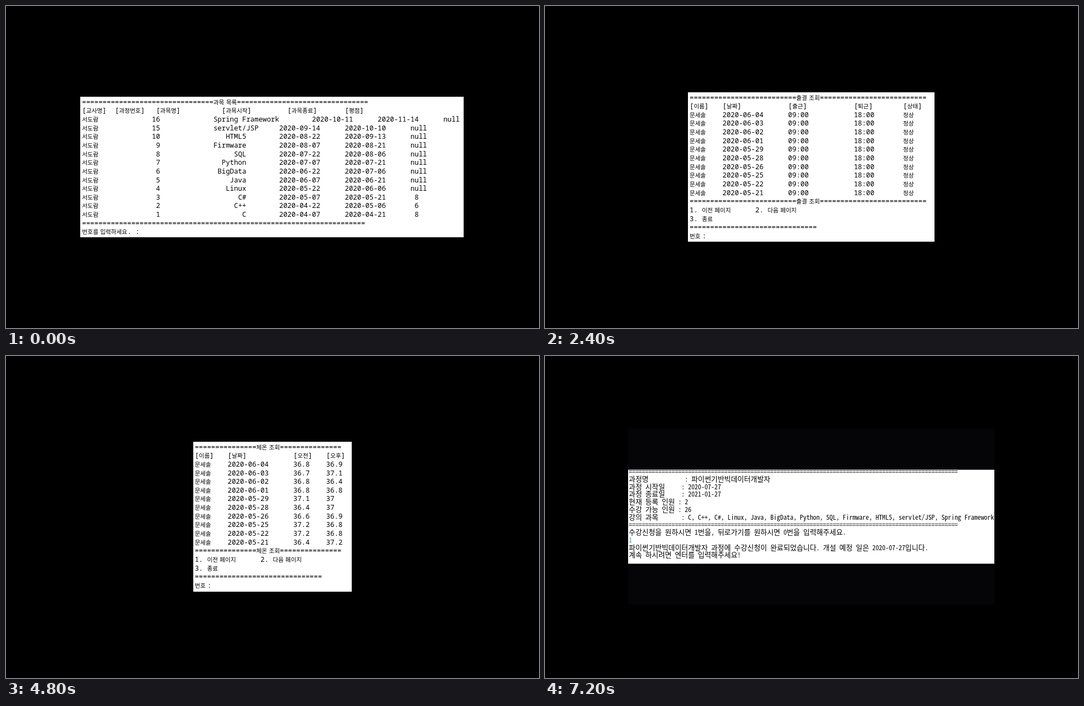
Recreate the animation shown at these times as an HTML page with a canvas. Size 962 px wide and 582 px high, loop 8000 ms.

```html
<!DOCTYPE html>
<html lang="ko">
<head>
<meta charset="utf-8">
<style>
html, body { margin: 0; width: 100%; height: 100%; overflow: hidden; background: #000; }
canvas { display: block; }
</style>
</head>
<body>
<canvas id="stage" width="962" height="582"></canvas>
<script>
const ctx = document.getElementById('stage').getContext('2d', { alpha: false });
const SLIDE_MS = 800;

const CONSOLE = {
  latin: "500 12.35px 'Noto Sans Mono', monospace",
  hangul: "10.65px 'Noto Sans CJK KR', 'Noto Sans CJK JP', sans-serif",
  space: '0.9px', cell: 7.41, pitch: 15.645
};
const NARROW_FAMILY = "'Noto Sans Mono CJK KR', 'Noto Sans Mono CJK JP', monospace";
const NARROW = {
  latin: '11.88px ' + NARROW_FAMILY,
  hangul: '12.91px ' + NARROW_FAMILY,
  space: '-0.5px', cell: 5.94, pitch: 13.73
};

const rule = (n, ch = '=') => ch.repeat(n);
const titled = (title, n) => rule(n) + title + rule(n);
const list = (n, fn) => Array.from({ length: n }, (_, i) => fn(i));
const person = i => '한오서문남노배'[i % 7] + '도보세유하'[i * 2 % 5] + '람결빈율온솔'[i * 5 % 6];

// "@n text" jumps to character column n, "^" marks typed input.
const pager = ['1. 이전 페이지@16 2. 다음 페이지', '3. 종료'];
const pagerEnd = [...pager, rule(31), '번호 :'];

const subjects = `16 Spring Framework 10-11 11-14
15 servlet/JSP 09-14 10-10
10 HTML5 08-22 09-13
9 Firmware 08-07 08-21
8 SQL 07-22 08-06
7 Python 07-07 07-21
6 BigData 06-22 07-06
5 Java 06-07 06-21
4 Linux 05-22 06-06
3 C# 05-07 05-21 8
2 C++ 04-22 05-06 6
1 C 04-07 04-21 8`.split('\n').map(line => {
  const [, no, name, from, to, grade] = line.match(/^(\d+) (.+) (\d\d-\d\d) (\d\d-\d\d) ?(\d?)$/);
  const shift = name.length > 11 ? 8 : 0;
  return `${person(30)}@${19 - no.length} ${no}@${Math.max(32, 40 - name.length)} ${name}` +
    `@${48 + shift} 2020-${from}@${64 + shift} 2020-${to}` +
    (grade ? `@81 ${grade}` : `@${80 + shift} null`);
});
const subjectTable = [
  titled('과목 목록', 32),
  '[교사명]@8 [과정번호]@18 [과목명]@34 [과목시작]@50 [과목종료]@64 [평점]',
  ...subjects, rule(69)
];

const calendar = list(5, week => list(7, d => week * 7 + d)
  .map((n, d) => n > 0 && n < 32 ? `@${d * 3 + (n < 10 ? 2 : 1)} ${n}` : '').join(''));

const temperatures = `06-04 36.8 36.9
06-03 36.7 37.1
06-02 36.8 36.4
06-01 36.8 36.8
05-29 37.1 37
05-28 36.4 37
05-26 36.6 36.9
05-25 37.2 36.8
05-22 37.2 36.8
05-21 36.4 37.2`.split('\n').map(line => line.split(' '));
const temperatureRow = ([day, am, pm]) => `${person(31)}@8 2020-${day}@24 ${am}@32 ${pm}`;
const temperatureHead = [titled('체온 조회', 15), '[이름]@8 [날짜]@24 [오전]@32 [오후]'];

const JAVA = 'Java기반 멀티 플랫폼 SW개발자 ...';
const SPRING = '자바 스프링 백엔드 개발자 양성 과정';
const jobHead = [
  titled('취업 정보', 59),
  '[이름]@8 [과정번호]@16 [과정명]@56 [상태]@72 [회사명]@92 [연봉]'
];
function jobRow(who, no, course, firm, pay, payCol, state = '수강중') {
  const col = course === JAVA ? 64 : 56;
  const rest = firm ? `@${col + 16} ${firm}@${payCol} ${pay},000,000` : `@${col + 17} -@${col + 49} -`;
  return `${person(who)}@12 ${no}@24 ${course}@${col} ${state}${rest}`;
}
const FOOD = '누벼리', SOFT = '(주)루벡스소프트';
const hires = {
  1: [FOOD, 30, 98],
  9: [SOFT, 29, 106, '중도탈락'],
  11: ['모르니카TV', 32, 106],
  15: ['늘찬교육센터', 33, 106]
};

// box: x, y, width, height; x, y: start of the first baseline.
const slides = [
  { box: [134, 164, 692, 254], x: 137.3, y: 177.7, lines: [...subjectTable, '번호를 입력하세요. :'] },
  { box: [132, 149, 697, 284], x: 135.3, y: 163, lines: [...subjectTable, ...pager, '번호 :'] },
  { box: [380, 162, 200, 257], x: 384.3, y: 178, lines: [
    '<<< 2020년  6월 >>>>', '@0.4 일   월   화   수   목   금   토', rule(21, '-'),
    ...calendar, '', '',
    rule(15), '1. 출결 조회', '2. 출결 기록', '0. 뒤로가기', rule(15), '번호 :'] },
  { box: [258, 156, 445, 270], x: 261, y: 169.5, lines: [
    titled('출결 조회', 26), '[이름]@8 [날짜]@24 [출근]@40 [퇴근]@52 [상태]',
    ...temperatures.map(([day]) => `${person(31)}@8 2020-${day}@24 09:00@40 18:00@52 정상`),
    titled('출결 조회', 26), ...pagerEnd] },
  { box: [362, 227, 237, 127], x: 363.7, y: 236.3, lines: [
    rule(25), '1. 출근/퇴근', '0. 뒤로가기', rule(25), '번호 : ^1', '',
    '현재 시간 : 2020-06-17 00:06:41', '> 출근 하시겠습니까?(y/n) :'] },
  { box: [293, 72, 376, 437], x: 296, y: 85.5, lines: [
    ...temperatureHead, ...list(21, i => temperatureRow(temperatures[i % 10])),
    titled('체온 조회', 15), ...pagerEnd] },
  { box: [338, 155, 286, 271], x: 340.7, y: 168.6, lines: [
    ...temperatureHead, ...temperatures.map(temperatureRow), titled('체온 조회', 15), ...pagerEnd] },
  { box: [2, 160, 958, 262], x: 3.3, y: 171.2, lines: [
    ...jobHead,
    jobRow(0, 3, JAVA),
    jobRow(1, 3, JAVA, FOOD, 30, 98),
    jobRow(32, 6, SPRING, '해람모듈론', 31, 98),
    jobRow(33, 6, SPRING, SOFT, 33, 98),
    jobRow(34, 6, SPRING),
    jobRow(35, 2, 'Java/JavaScript libr...', '누빔코리아', 33, 98),
    jobRow(36, 6, SPRING, FOOD, 33, 90),
    jobRow(37, 6, SPRING),
    jobRow(2, 3, JAVA),
    jobRow(38, 6, SPRING),
    rule(126), ...pagerEnd] },
  { box: [0, 0, 962, 582], x: 3.3, y: 13.3, lines: [
    rule(25), '1. 과정별 취업 현황 조회', '0. 뒤로가기', rule(25), '번호 : ^1', '',
    '과정 번호 : ^3', '', ...jobHead,
    ...list(26, i => jobRow(i, 3, JAVA, ...(hires[i] || []))), rule(126)] },
  { backdrop: [150, 131, 661, 318], box: [150, 205.6, 661, 169.8], x: 151.3, y: 213.2, style: NARROW, lines: [
    rule(100),
    '과정명@17 : 파이썬기반빅데이터개발자',
    '과정 시작일@16 : 2020-07-27',
    '과정 종료일@16 : 2021-01-27',
    '현재 등록 인원 : 2',
    '수강 가능 인원 : 26',
    '강의 과목@16 : C, C++, C#, Linux, Java, BigData, Python, SQL, Firmware, HTML5, servlet/JSP, Spring Framework',
    rule(100),
    '수강신청을 원하시면 1번을, 뒤로가기를 원하시면 0번을 입력해주세요.',
    '^1',
    '파이썬기반빅데이터개발자 과정에 수강신청이 완료되었습니다. 개설 예정 일은 2020-07-27입니다.',
    '계속 하시려면 엔터를 입력해주세요!'] }
];

function drawText(text, x, y, style) {
  for (let run of text.match(/\^\d|[가-힣]+(?: +[가-힣]+)* ?|[^가-힣^]+/g) || []) {
    const hangul = /[가-힣]/.test(run), typed = run[0] === '^';
    if (typed) run = run.slice(1);
    ctx.font = hangul ? style.hangul : style.latin;
    ctx.wordSpacing = hangul ? style.space : '0px';
    ctx.fillStyle = typed ? '#00c87d' : '#000';
    ctx.fillText(run, x, y);
    x += ctx.measureText(run).width;
  }
}

function fillBox(color, box) {
  ctx.fillStyle = color;
  ctx.fillRect(...box);
}

function drawSlide({ backdrop, box, x, y, lines, style = CONSOLE }) {
  fillBox('#000', [0, 0, 962, 582]);
  if (backdrop) fillBox('#050507', backdrop);
  fillBox('#fff', box);
  lines.forEach((line, row) => {
    const parts = ['0', ...line.split(/@([\d.]+) /)];
    for (let i = 0; i < parts.length; i += 2) {
      drawText(parts[i + 1], x + parts[i] * style.cell, y + row * style.pitch, style);
    }
  });
}

let shown = -1;
function tick() {
  const index = Math.floor(performance.now() / SLIDE_MS) % slides.length;
  if (index !== shown) drawSlide(slides[shown = index]);
  requestAnimationFrame(tick);
}
tick();
</script>
</body>
</html>
```
